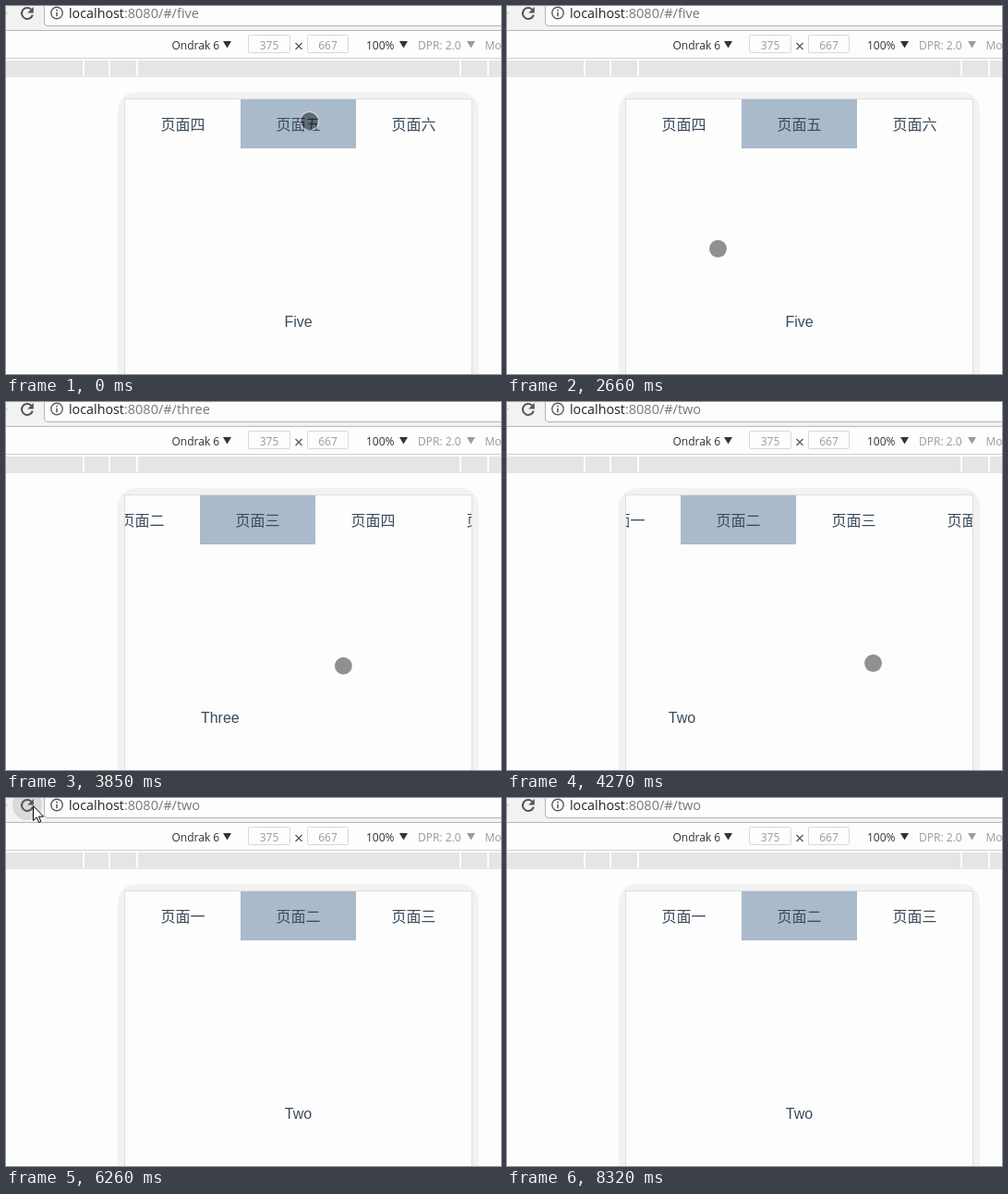
An HTML page for the animation above (9160 ms loop, 536 by 398 pixels).

```html
<!DOCTYPE html>
<html lang="zh">
<head>
<meta charset="utf-8">
<title>Swipe tabs</title>
<style>
html, body { margin: 0; width: 100%; height: 100%; overflow: hidden; background: #fdfdfd; }
svg { display: block; width: 536px; height: 398px; }
.ui { font: 12px "Open Sans", "Noto Sans", sans-serif; fill: #333; }
.ui .dim { fill: #9b9b9b; }
.url { font: 14.3px "Open Sans", "Noto Sans", sans-serif; fill: #222; }
.url tspan { font-size: 14.5px; fill: #777; }
.page { font: 16px "Liberation Sans", Arial, sans-serif; fill: #3a4b5c; text-anchor: middle; }
.tab { font-family: "Noto Sans CJK SC", "Noto Sans CJK", sans-serif; }
.mid { text-anchor: middle; }
</style>
</head>
<body>
<svg viewBox="0 0 536 398" xmlns="http://www.w3.org/2000/svg">
  <defs>
    <clipPath id="screen"><rect x="129" y="101" width="375" height="297"/></clipPath>
    <path id="caret" d="M-4.5 38H4.5L0 45.5Z"/>
  </defs>
  <rect width="536" height="398" fill="#fdfdfd"/>

  <!-- address bar -->
  <rect width="536" height="26" fill="#f2f2f2"/>
  <path d="M41.5-2V18Q41.5 21.5 45 21.5H540V-2Z" fill="#fdfdfd" stroke="#b4b4b4"/>
  <path d="M0 26.5H536" stroke="#b6b6b6"/>
  <path d="M0 56.5H536" stroke="#cfcfcf"/>
  <path d="M0 6.5L1.5 8 0 9.5Z" fill="#bbb"/>
  <circle id="hover" cx="23" cy="8" r="16" fill="#d9d9d9"/>
  <g id="reload">
    <path d="M27.3 3.7A6 6 0 1 0 28.8 9.6" fill="none" stroke="#555" stroke-width="2"/>
    <path d="M29.8 1V7.6H23.2Z" fill="#555"/>
  </g>
  <path id="stop" d="M17.5 2.5L28.5 13.5M28.5 2.5L17.5 13.5" stroke-width="2.2"/>
  <circle cx="55" cy="7.5" r="6.2" fill="none" stroke="#5a5a5a" stroke-width="1.4"/>
  <path d="M55 3.8V5.4M55 6.8V11.2" stroke="#5a5a5a" stroke-width="1.6"/>
  <text class="url" x="68" y="13">localhost<tspan id="route"></tspan></text>

  <!-- device toolbar -->
  <g class="ui">
    <text x="179.5" y="47">Ondrak 6</text>
    <use href="#caret" x="239.5"/>
    <g fill="#fdfdfd" stroke="#d8d8d8">
      <rect x="262.5" y="31.5" width="45" height="19" rx="1"/>
      <rect x="326.5" y="31.5" width="44" height="19" rx="1"/>
    </g>
    <text class="dim mid" x="285" y="47">375</text>
    <path d="M313.5 40L320.5 47M320.5 40L313.5 47" stroke="#555" stroke-width="1.2"/>
    <text class="dim mid" x="348.5" y="47">667</text>
    <text x="390" y="47">100%</text>
    <use href="#caret" x="430.5"/>
    <text class="dim" x="446" y="47">DPR: 2.0</text>
    <use class="dim" href="#caret" x="503.5"/>
    <text class="dim" x="518.5" y="47">Mobile</text>
  </g>
  <rect y="59" width="536" height="18" fill="#e5e5e5"/>
  <path d="M84 59V76M112 59V76M142 59V76M492 59V76M522 59V76" stroke="#fdfdfd" stroke-width="2"/>

  <!-- device -->
  <rect x="121" y="93" width="391" height="340" rx="20" fill="#f2f2f2"/>
  <rect x="128.5" y="100.5" width="376" height="310" fill="#fdfdfd" stroke="#dedede"/>
  <g clip-path="url(#screen)">
    <g id="tabs"><rect id="mark" y="101" width="125" height="53" fill="#a9bacb"/></g>
    <g id="pages"></g>
  </g>

  <g id="touch">
    <circle r="10" fill="none" stroke="#fff" stroke-opacity=".4" stroke-width="1.6"/>
    <circle r="9.4" fill-opacity=".43"/>
  </g>
  <path id="arrow" d="M.5.5V16.5L4.2 13 6.6 18.4 8.8 17.4 6.5 12.1H11.6Z" fill="#fff" stroke="#000"/>
</svg>
<script>
const LOOP = 9160, FRAME = 134;
const CENTER = 316.5, TAB = 125, PAGE = 375;
const $ = id => document.getElementById(id);
const clamp = v => Math.max(0, Math.min(1, v));

const bursts = [
  [680, 950], [1410, 2390], [2540, 2660], [3070, 4110],
  [4270, 5210], [5330, 5990], [7510, 8320]
];

// Three equal swipes: the finger drags a page part of the way, then it slides home
const DRAG = 195, SLIDE = 170, REACH = 0.36;
const swipes = [[240, 270], [309.5, 287.5], [261, 282.5]]
  .map(([x, y], i) => ({ x, y, release: 3290 + 450 * i }));

// Pointer stops: time, x, y
const pointer = [
  [0, 328.5, 124.5], [680, 321, 122], [950, 176, 8], [1410, 215, 86],
  [1970, 255, 165], [2390, 226, 176], [2660, 228.5, 262.5],
  ...swipes.flatMap(({ x, y, release }) => [
    [release - DRAG, x, y],
    [release, x + PAGE * REACH, y]
  ]),
  [4270, 396.5, 282.5], [5076, 235, 202], [5210, 98, 0], [5990, 29, 8],
  [7510, 225, 110], [8185, 379, 343]
];

const numerals = "一二三四五六";
const titles = ["One", "Two", "Three", "four", "Five", "Six"];

function addText(parent, content, x, y, cls) {
  const el = document.createElementNS("http://www.w3.org/2000/svg", "text");
  el.setAttribute("class", cls);
  el.setAttribute("x", x);
  el.setAttribute("y", y);
  el.textContent = content;
  parent.append(el);
}
titles.forEach((title, i) => {
  addText($("tabs"), "页面" + numerals[i], TAB * (i + 1), 134, "page tab");
  addText($("pages"), title, PAGE * (i + 1), 347, "page");
});

function snap(t) {
  const burst = bursts.filter(([start]) => t >= start).pop();
  if (!burst) return 0;
  const [start, end] = burst;
  const step = (end - start) / Math.round((end - start) / FRAME);
  return Math.min(end, start + Math.floor((t - start) / step + 1e-6) * step);
}

function pointerAt(t) {
  const next = pointer.findIndex(([at]) => at > t);
  if (next < 0) return pointer[pointer.length - 1].slice(1);
  const [t0, x0, y0] = pointer[next - 1], [t1, x1, y1] = pointer[next];
  const k = (t - t0) / (t1 - t0);
  return [x0 + (x1 - x0) * k, y0 + (y1 - y0) * k];
}

function scrollAt(t) {
  let page = 5, tab = 5, current = 5;
  for (const { release } of swipes) {
    const drag = clamp((t - release + DRAG) / DRAG);
    const slide = clamp((t - release) / SLIDE);
    page -= REACH * drag + (1 - REACH) * slide;
    tab -= slide;
    if (t >= release) current--;
  }
  return { page, tab, current };
}

const place = (el, x, y) => el.setAttribute("transform", `translate(${x} ${y})`);
const show = (el, on) => el.setAttribute("visibility", on ? "visible" : "hidden");

function draw(t) {
  const held = snap(t);
  const { page, tab, current } = scrollAt(held);
  place($("tabs"), Math.round(CENTER - TAB * tab + 0.5) - 0.5, 0);
  place($("pages"), CENTER - PAGE * page, 0);
  $("mark").setAttribute("x", TAB * (current - 0.5));
  $("route").textContent = ":8080/#/" + titles[current - 1].toLowerCase();

  const loading = t >= 6960 && t < 7510;
  show($("hover"), t >= 6260 && t < 6690);
  show($("reload"), !loading);
  show($("stop"), loading);
  $("stop").setAttribute("stroke", t < 7110 ? "#555" : "#bbb");

  const [x, y] = pointerAt(held);
  const visible = t < 8320;
  const inside = x > 129 && x < 504 && y > 100;
  place($("touch"), x, y);
  place($("arrow"), x, y);
  show($("touch"), visible && inside);
  show($("arrow"), visible && !inside);
}

const began = performance.now();
function tick() {
  draw((performance.now() - began) % LOOP);
  requestAnimationFrame(tick);
}
tick();
</script>
</body>
</html>
```
